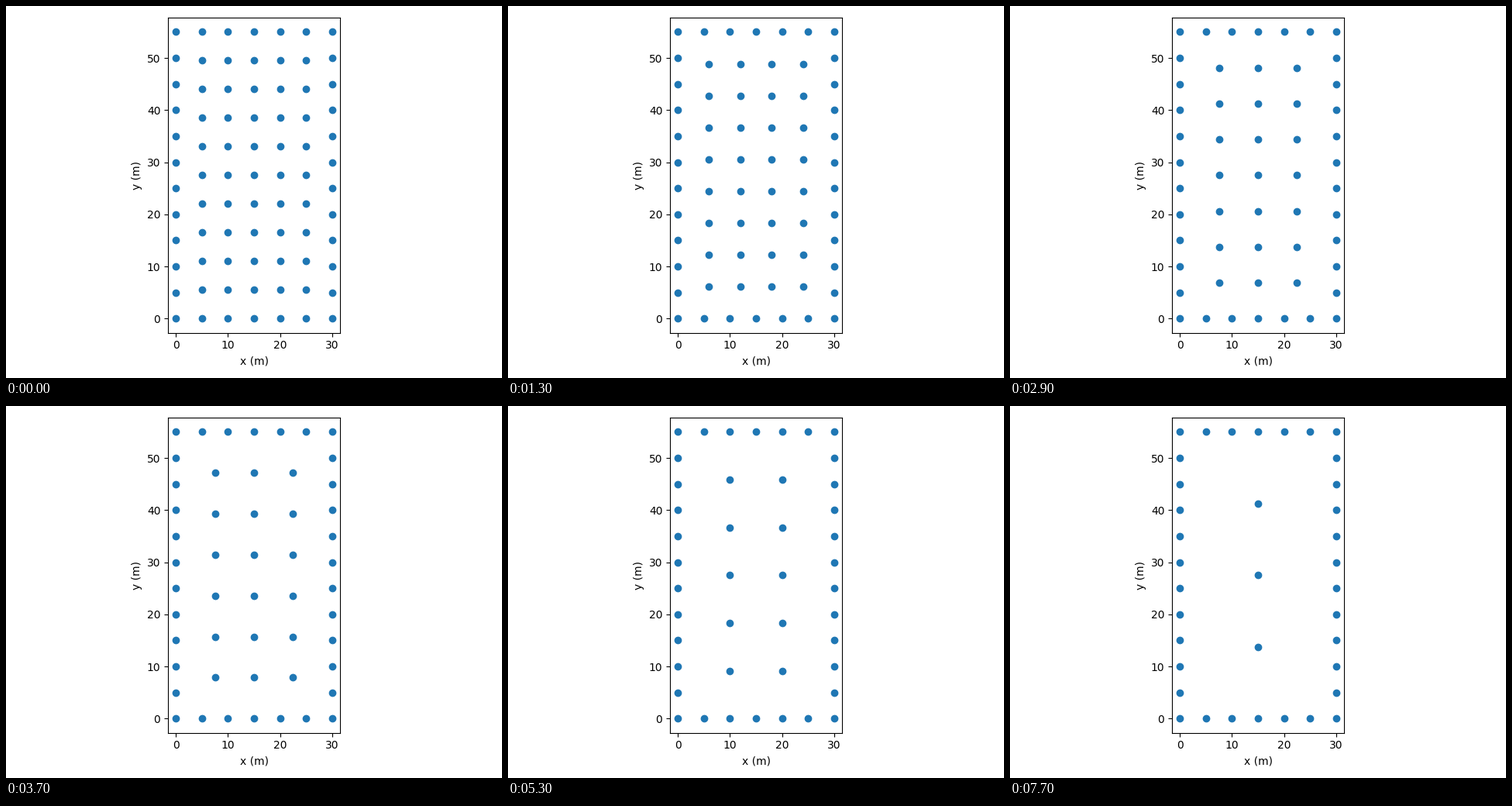
Write a matplotlib script that moves like this. It is 640 by 480 pixels and loops after 8000 ms.

```python
import numpy as np
import matplotlib.pyplot as plt
from matplotlib.animation import FuncAnimation

WIDTH, HEIGHT = 30, 55        # field size in metres
EDGE_STEP = 5                 # spacing along the perimeter
TICK, HOLD, LOOP = 100, 800, 8000
LEAD = 300                    # part of the first hold that is already over

# Interior divisions (columns, rows), thinning out step by step
DIVISIONS = [(6, 10), (5, 10), (5, 9), (5, 8), (4, 8), (4, 7),
             (4, 6), (3, 6), (3, 5), (2, 5), (2, 4)]


def perimeter():
    xs = np.arange(0, WIDTH + 1, EDGE_STEP)
    ys = np.arange(EDGE_STEP, HEIGHT, EDGE_STEP)
    rows = [(x, y) for y in (0, HEIGHT) for x in xs]
    sides = [(x, y) for x in (0, WIDTH) for y in ys]
    return rows + sides


def interior(cols, rows):
    return [(WIDTH * i / cols, HEIGHT * j / rows)
            for i in range(1, cols) for j in range(1, rows)]


def layout(cols, rows):
    return np.array(perimeter() + interior(cols, rows), dtype=float)


fig, ax = plt.subplots(figsize=(6.4, 4.8), dpi=100)
dots = ax.scatter(*layout(*DIVISIONS[0]).T, color="#1f77b4")
ax.set_xlabel("x (m)")
ax.set_ylabel("y (m)")
ax.set_aspect("equal")
fig.tight_layout()


def update(frame):
    stage = (frame * TICK + LEAD) // HOLD
    dots.set_offsets(layout(*DIVISIONS[stage]))
    return (dots,)


anim = FuncAnimation(fig, update, frames=LOOP // TICK, interval=TICK,
                     repeat=True, repeat_delay=0)
plt.show()
```
